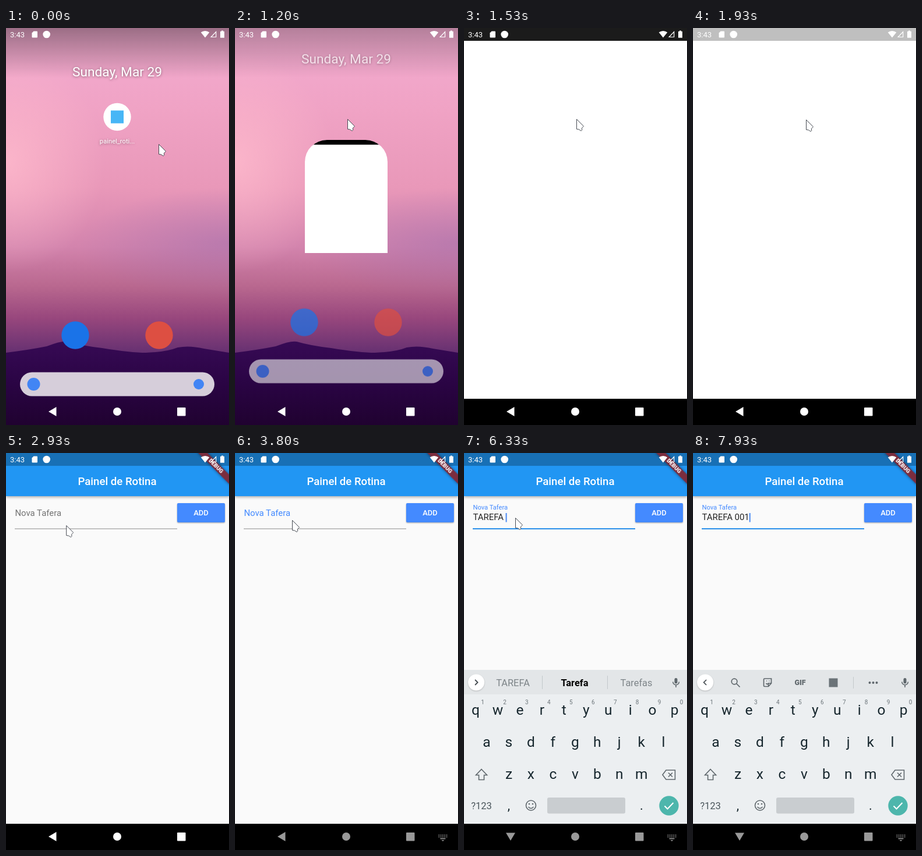
Write an HTML page that moves like this. It is 383 px wide and 681 px high and loops after 8 s.

```html
<!DOCTYPE html>
<html lang="pt">
<head>
<meta charset="utf-8">
<title>Painel</title>
<style>
html, body { margin: 0; width: 100%; height: 100%; overflow: hidden; background: #22042f; }
svg { position: absolute; left: 0; top: 0; width: 383px; height: 681px; overflow: hidden; font-family: Roboto, "Open Sans", sans-serif; }
text { white-space: pre; }
.mid { text-anchor: middle; }
.white { fill: #fff; }
.glow { filter: drop-shadow(0 1px 2px rgba(0,0,0,.4)); }

.scrim, .home, .tile, .win, .win div, .strip, .app, .kb, .dim, .ime, .back,
.label, .float, .focus, .caret, .sug, .tools, .mouse { animation: 8s linear infinite both; }

/* launch */
.scrim { animation-name: fade; }
.home { animation-name: fade, lift; }
.tile { animation-name: tile; animation-timing-function: step-end; }
@keyframes fade {
  0%, 13.375% { opacity: 1; }
  15% { opacity: .72; }
  16.625% { opacity: .08; }
  17.4%, 100% { opacity: 0; }
}
@keyframes lift {
  0%, 13.375% { transform: translateY(0); }
  15% { transform: translateY(-22px); }
  16.625%, 100% { transform: translateY(-45px); }
}
@keyframes tile { 0% { opacity: 1; } 13.375%, 100% { opacity: 0; } }

.win { position: absolute; overflow: hidden; background: #fff; animation-name: grow, seen; }
.win div { position: absolute; left: 0; width: 383px; height: 681px; transform-origin: 0 0; animation-name: scale; }
.win i { position: absolute; left: 0; width: 383px; background: #000; }
.win .strip { top: 0; height: 22px; animation-name: strip; }
.win .foot { top: 636px; height: 45px; }
@keyframes seen { 0%, 13.37% { opacity: 0; } 13.375%, 100% { opacity: 1; } }
@keyframes grow {
  0%, 13.375% { left: 167px; top: 129px; width: 48px; height: 48px; border-radius: 24px; animation-timing-function: ease-in; }
  15% { left: 121px; top: 193px; width: 140px; height: 191px; border-radius: 38px 38px 0 0; }
  16.625% { left: 15px; top: 35px; width: 352px; height: 608px; border-radius: 10px; animation-timing-function: ease-out; }
  18.75%, 100% { left: 0; top: 0; width: 383px; height: 681px; border-radius: 0; }
}
@keyframes scale {
  0%, 13.375% { transform: scale(.125); animation-timing-function: ease-in; }
  15% { transform: scale(.3655); }
  16.625% { transform: scale(.919); animation-timing-function: ease-out; }
  18.75%, 100% { transform: scale(1); }
}
@keyframes strip { 0%, 18.75% { background: #000; } 21.5%, 100% { background: #bfbfbf; } }

/* app */
.app { animation-name: app; }
@keyframes app { 0%, 32.5% { opacity: 0; } 36.25%, 100% { opacity: 1; } }
.label { animation-name: ink; animation-timing-function: step-end; }
@keyframes ink { 0% { fill: #747474; } 47.5%, 100% { fill: #448aff; } }
.float { animation-name: float; }
@keyframes float {
  0%, 48.6% { transform: translate(15.5px, 108px); }
  50.875%, 100% { transform: translate(15.5px, 97px) scale(.75); }
}
.focus { animation-name: focus; }
@keyframes focus { 0%, 48.6% { opacity: 0; } 51.5%, 100% { opacity: 1; } }
.caret { animation-name: caret; animation-timing-function: step-end; }
@keyframes caret { 0% { opacity: 0; } 53.375% { opacity: 1; } 90% { opacity: 0; } 95.875%, 100% { opacity: 1; } }

/* keyboard and navigation */
.kb { animation-name: rise; }
@keyframes rise {
  0%, 48.6% { opacity: 0; transform: translateY(264px); }
  48.7% { opacity: 1; transform: translateY(264px); animation-timing-function: ease-out; }
  50.875%, 100% { opacity: 1; transform: translateY(0); }
}
.sug, .tools, .dim, .ime { animation-timing-function: step-end; }
.sug { animation-name: sug; }
.tools { animation-name: tools; }
@keyframes sug { 0% { opacity: 0; } 61.625% { opacity: 1; } 80.375%, 100% { opacity: 0; } }
@keyframes tools { 0% { opacity: 1; } 61.625% { opacity: 0; } 80.375%, 100% { opacity: 1; } }
.dim { animation-name: dim; }
.ime { animation-name: ime; }
@keyframes dim { 0% { opacity: 1; } 47.5%, 100% { opacity: .6; } }
@keyframes ime { 0% { opacity: 0; } 47.5%, 100% { opacity: .6; } }
.back { transform-origin: 80px 658px; animation-name: back; }
@keyframes back { 0%, 48.6% { transform: rotate(0); } 50.875%, 100% { transform: rotate(-90deg); } }

.mouse { animation-name: mouse; }
@keyframes mouse {
  0% { transform: translate(262px, 199px); animation-timing-function: ease-in-out; }
  6.6%, 23.3% { transform: translate(193px, 156px); }
  24.125% { transform: translate(194px, 157px); animation-timing-function: ease-in-out; }
  39.1%, 42% { transform: translate(98px, 122px); }
  43.375%, 52.8% { transform: translate(98px, 115px); }
  54.125%, 89.4% { transform: translate(88px, 111px); animation-timing-function: ease-in-out; }
  92.5%, 94.5% { transform: translate(278px, 112px); animation-timing-function: linear; }
  99%, 100% { transform: translate(386px, 120px); }
}
</style>
</head>
<body>
<svg viewBox="0 0 383 681">
  <defs>
    <linearGradient id="sky" x2="0" y2="1">
      <stop stop-color="#f3acd1"/>
      <stop offset=".2" stop-color="#f0a3c5"/>
      <stop offset=".4" stop-color="#e998b9"/>
      <stop offset=".55" stop-color="#d384ad"/>
      <stop offset=".65" stop-color="#b9688f"/>
      <stop offset=".73" stop-color="#98477d"/>
      <stop offset=".82" stop-color="#653071"/>
    </linearGradient>
    <radialGradient id="warm"><stop stop-color="#ffbbcd" stop-opacity=".8"/><stop offset="1" stop-color="#ffbbcd" stop-opacity="0"/></radialGradient>
    <radialGradient id="cool"><stop stop-color="#a06fae" stop-opacity=".5"/><stop offset="1" stop-color="#a06fae" stop-opacity="0"/></radialGradient>
    <linearGradient id="hill" x2="0" y2="1"><stop stop-color="#370a55"/><stop offset=".5" stop-color="#2a0444"/><stop offset="1" stop-color="#200230"/></linearGradient>
    <linearGradient id="shade" x2="0" y2="1"><stop stop-opacity=".36"/><stop offset="1" stop-opacity="0"/></linearGradient>
  </defs>
  <rect width="383" height="681" fill="url(#sky)"/>
  <ellipse cx="0" cy="230" rx="170" ry="190" fill="url(#warm)"/>
  <ellipse cx="383" cy="370" rx="260" ry="95" fill="url(#cool)"/>
  <path fill="url(#hill)" d="M0 557Q40 552 70 546Q95 536 106 538Q130 545 165 549Q215 557 240 557Q275 556 295 548Q315 544 340 550L383 557V681H0Z"/>
  <rect class="scrim" width="383" height="85" fill="url(#shade)"/>
  <g class="home">
    <text class="mid white glow" x="191" y="83" font-size="22.7">Sunday, Mar 29</text>
    <circle cx="119" cy="527" r="23.7" fill="#1a73e8"/>
    <circle cx="263" cy="527" r="23.7" fill="#dd4f42"/>
    <rect x="24" y="590.5" width="334" height="41" rx="20.5" fill="#d6ceda"/>
    <circle cx="47.5" cy="611" r="11" fill="#4285f4"/>
    <circle cx="331" cy="611" r="9" fill="#4285f4"/>
  </g>
  <g class="tile">
    <circle class="white" cx="191" cy="152.5" r="23.7"/>
    <rect x="180" y="141.500" width="22" height="22" fill="#47b6f6"/>
    <text class="mid white glow" x="191" y="198" font-size="11.2">painel_roti...</text>
  </g>
</svg>

<div class="win"><div><i class="strip"></i><i class="foot"></i></div></div>

<svg viewBox="0 0 383 681">
  <g class="app">
    <rect width="383" height="681" fill="#fafafa"/>
    <rect width="383" height="74" fill="#2196f3" style="filter:drop-shadow(0 2px 2px rgba(0,0,0,.3))"/>
    <rect width="383" height="22" fill="#1870b5"/>
    <text class="mid white" x="191" y="55" font-size="18.6" font-weight="500">Painel de Rotina</text>
    <rect x="294" y="86" width="82" height="33" rx="2" fill="#448aff" style="filter:drop-shadow(0 1px 1px rgba(0,0,0,.35))"/>
    <text class="mid white" x="335" y="107" font-size="13" font-weight="500">ADD</text>
    <rect x="15" y="129.500" width="279" height="1" fill="#8c8c8c"/>
    <rect class="focus" x="15" y="129" width="279" height="2" fill="#2a8fea"/>
    <g class="float"><text class="label" font-size="14.9">Nova Tafera</text></g>
    <text id="typed" x="15.500" y="115" font-size="14.9" fill="#212121"></text>
    <rect id="caret" class="caret" x="15.500" y="103" width="2" height="15.500" fill="#4a8af4"/>
    <g transform="translate(383 0) scale(.932) rotate(45)">
      <rect x="-42" y="28" width="84" height="12" fill="#7b2d3e" style="filter:drop-shadow(0 0 3px rgba(0,0,0,.5))"/>
      <text class="mid white" y="37.700" font-size="10.2" font-weight="900">DEBUG</text>
    </g>
  </g>

  <g class="kb">
    <rect y="372" width="383" height="264" fill="#eceff1"/>
    <rect y="372" width="383" height="42" fill="#e3e6e8"/>
    <circle class="white" cx="21" cy="393.500" r="14" style="filter:drop-shadow(0 1px 1px rgba(0,0,0,.2))"/>
    <g class="sug">
      <path d="M19 389l4.500 4.500-4.500 4.500" fill="none" stroke="#444b50" stroke-width="1.800"/>
      <path d="M134.500 382v23M246.500 382v23" stroke="#c3c8cb"/>
      <g class="mid" font-size="16.4">
        <text class="word" x="84" y="400" fill="#7d8488"></text>
        <text class="word" x="190" y="400" font-weight="700"></text>
        <text class="word" x="296" y="400" fill="#7d8488"></text>
      </g>
    </g>
    <g class="tools" fill="none" stroke="#5f676c" stroke-width="1.700">
      <path d="M23 389l-4.500 4.500 4.500 4.500" stroke="#444b50"/>
      <circle cx="71" cy="392" r="4.800"/><path d="M74.500 395.500l6 6"/>
      <path d="M123 387h11.500v8l-5 5.500h-6.500a1.500 1.500 0 0 1-1.500-1.500v-10.500a1.500 1.500 0 0 1 1.500-1.500M134.500 395h-5v5M125.500 395q2 3 4 0M126 391h1M130.500 391h1"/>
      <text class="mid" x="184" y="398" font-size="12.500" font-weight="900" fill="#5f676c" stroke="none">GIF</text>
      <rect x="233.500" y="386.500" width="15" height="15" fill="#6b7378" stroke="none"/>
      <path d="M275.500 384v20" stroke="#c3c8cb" stroke-width="1"/>
      <path d="M303.500 394h.01M309.500 394h.01M315.500 394h.01" stroke-width="4" stroke-linecap="round"/>
    </g>
    <g fill="none" stroke="#5f676c" stroke-width="1.600">
      <rect x="361.500" y="386" width="5" height="9.500" rx="2.500" fill="#5f676c" stroke="none"/>
      <path d="M358.800 392.500a5.300 5.300 0 0 0 10.600 0M364 398v4"/>
      <path d="M30 542.500l9.500 10h-5v8h-9v-8h-5Z"/>
      <path d="M341 552l6-8h15.500v16h-15.500ZM351 548.500l7 7M358 548.500l-7 7"/>
      <circle cx="115" cy="604.500" r="8.500"/><path d="M110.500 607q4.500 5 9 0"/>
      <path d="M112 602h.01M118 602h.01" stroke-width="2.600" stroke-linecap="round"/>
    </g>
    <g id="keys" class="mid" fill="#16262d"></g>
    <text class="mid" x="30" y="611" font-size="16.5" fill="#4b565c">?123</text>
    <rect x="143" y="591" width="134" height="27.500" rx="3" fill="#c9cdd0"/>
    <circle cx="352" cy="605" r="16.700" fill="#4db6ac"/>
    <path d="M344.500 605.500l5 5 10-10.500" fill="none" stroke="#fff" stroke-width="2"/>
  </g>

  <rect class="app" y="636" width="383" height="45"/>
  <g class="white">
    <g class="dim">
      <path class="back" d="M73 658l13.500-8v16Z"/>
      <circle cx="191" cy="658" r="7"/>
      <rect x="294" y="651" width="14.500" height="14.500" rx="1"/>
    </g>
    <g class="ime" fill="none" stroke="#fff" stroke-width="1.700">
      <path d="M349.500 655.500h15M349.500 658.500h15" stroke-dasharray="1.800 1.500"/>
      <path d="M352.500 661.500h9"/>
      <path d="M354.500 664h5l-2.500 2Z" fill="#fff" stroke="none"/>
    </g>
    <text x="7" y="16" font-size="13">3:43</text>
    <path d="M47.500 5.500H53a1 1 0 0 1 1 1v9a1 1 0 0 1-1 1h-7.500a1 1 0 0 1-1-1v-7Z"/>
    <circle cx="69.700" cy="11" r="6.300"/>
    <path d="M342 16.500l-7.300-9a11.500 11.500 0 0 1 14.600 0Z"/>
    <path d="M360.700 15.500h-8.500l8.500-9Z" fill="none" stroke="#fff" stroke-width="1.200"/>
    <path d="M370 4.500h3v1.200h2v11h-7v-11h2Z"/>
  </g>
  <path class="mouse" d="M.5.5V17.500L4.500 18 8 20.500 9.800 18.800 9.300 15.800 12.500 12.500Z" fill="#fff" stroke="#454a52" stroke-linejoin="round"/>
</svg>

<script>
const $ = (id) => document.getElementById(id);

// keyboard letters
const keys = $('keys');
function key(x, y, size, char, color) {
  const el = document.createElementNS('http://www.w3.org/2000/svg', 'text');
  el.setAttribute('x', x);
  el.setAttribute('y', y);
  el.setAttribute('font-size', size);
  if (color) el.setAttribute('fill', color);
  el.textContent = char;
  keys.append(el);
}
function row(chars, x, y, size, color) {
  [...chars].forEach((c, i) => key(x + i * 37.95, y, size, c, color));
}
row('qwertyuiop', 20, 449, 24.5);
row('1234567890', 32, 431, 10, '#6b7479');
row('asdfghjkl', 39, 504, 24.5);
row('zxcvbnm', 77, 559, 24.5);
key(77, 612, 22, ',');
key(305, 612, 22, '.');

// typing
const typing = [
  [0, ''], [5000, 'TA'], [5200, 'TAR'], [5600, 'TARE'], [5730, 'TAREF'], [5870, 'TAREFA'],
  [6330, 'TAREFA '], [6430, 'TAREFA 0'], [6530, 'TAREFA 00'], [6670, 'TAREFA 001']
];
const hints = [
  [0, 'T', 'Thanks', 'Thank'], [5000, 'TA', 'Take', 'Talk'], [5200, 'TAR', 'Target', 'Tar'],
  [5600, 'TARE', 'Tared', 'Tares'], [5870, 'TAREFA', 'Tarefa', 'Tarefas']
];
const at = (list, t) => list.filter((s) => s[0] <= t).pop();
const words = document.querySelectorAll('.word');
const typed = $('typed'), caret = $('caret');
let start;

function tick(now) {
  start ??= now;
  const t = (now - start) % 8000;
  const text = at(typing, t)[1];
  typed.textContent = text;
  caret.setAttribute('x', 15.5 + (text ? typed.getComputedTextLength() : 0));
  const hint = at(hints, t);
  words.forEach((w, i) => { w.textContent = hint[i + 1]; });
  requestAnimationFrame(tick);
}
requestAnimationFrame(tick);
</script>
</body>
</html>
```
